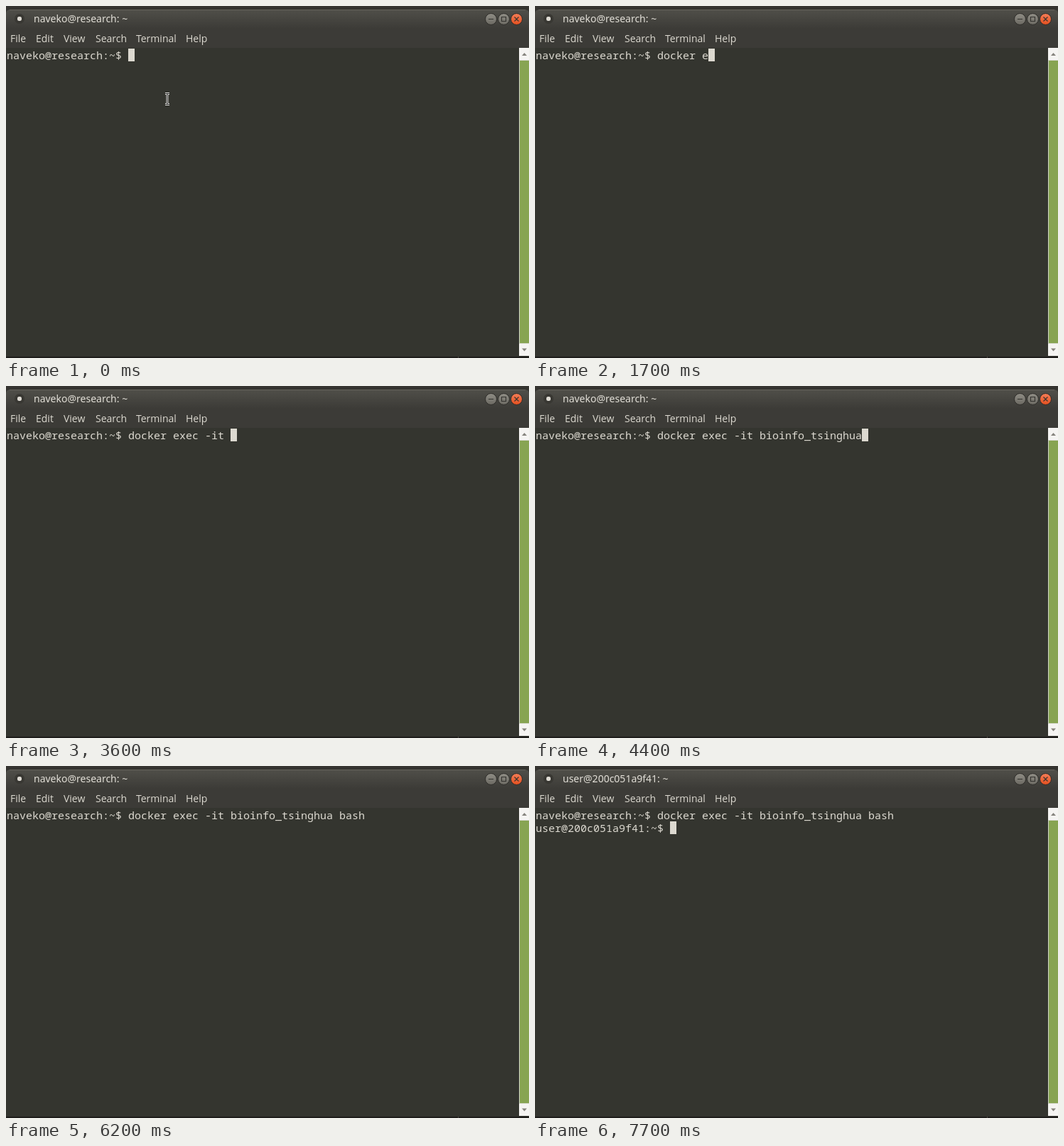
An HTML page that plays this animation: 736x496 px, repeating every 8 s.

```html
<!DOCTYPE html>
<html lang="en">
<head>
<meta charset="utf-8">
<title>Terminal session</title>
<style>
  html, body { margin: 0; width: 100%; height: 100%; overflow: hidden; background: #34352f; }
  svg { display: block; width: 736px; height: 496px; }
  text { white-space: pre; fill: #dcd9d0; }
  .ui { font: 14px "Open Sans", "Noto Sans", sans-serif; }
  .title { font: 500 14px "Noto Sans", "Open Sans", sans-serif; fill: #e2dfd7; }
  .mono { font: 15px "Noto Sans Mono", "Liberation Mono", monospace; }
  .crisp { shape-rendering: crispEdges; }
</style>
</head>
<body>
<svg viewBox="0 0 736 496">
  <defs>
    <linearGradient id="bar" x2="0" y2="1">
      <stop stop-color="#504f49"/><stop offset="1" stop-color="#3c3b37"/>
    </linearGradient>
    <linearGradient id="grey" x2="0" y2="1">
      <stop stop-color="#8f8d85"/><stop offset="1" stop-color="#6b6962"/>
    </linearGradient>
    <linearGradient id="orange" x2="0" y2="1">
      <stop stop-color="#f47e58"/><stop offset="1" stop-color="#e4501f"/>
    </linearGradient>
  </defs>

  <rect width="736" height="12" fill="#353430"/>
  <path d="M0 32V11Q0 5 6 5H730Q736 5 736 11V32Z" fill="url(#bar)"/>
  <path d="M5 5.5H731" stroke="#65635c"/>
  <rect y="32" width="736" height="27" fill="#3c3b37"/>
  <rect y="59" width="736" height="435" fill="#34352f"/>
  <rect class="crisp" y="494" width="736" height="2" fill="#1e1d1b"/>
  <rect class="crisp" x="636" y="494" width="1" height="2" fill="#4a4944"/>

  <circle cx="19" cy="18" r="7" fill="#393833"/>
  <circle cx="19" cy="18" r="3.8" fill="#dedbd3" stroke="#252420"/>
  <text id="title" class="title" x="39" y="23"></text>
  <g id="menu" class="ui"></g>

  <g stroke="#2b2a27">
    <circle cx="682.5" cy="18.5" r="8" fill="url(#grey)"/>
    <circle cx="700.5" cy="18.5" r="8" fill="url(#grey)"/>
    <circle cx="718.5" cy="18.5" r="8" fill="url(#orange)"/>
    <path d="M679 18.5h7M697.5 15.5h6v6h-6zM715.5 15.5l6 6m0 -6l-6 6" fill="none" stroke="#34332f" stroke-width="1.1"/>
  </g>

  <g class="crisp">
    <rect x="722" y="59" width="14" height="434" fill="#f5f4f2"/>
    <rect x="722" y="76" width="14" height="400" fill="#d3d6c8"/>
    <rect x="723" y="77" width="13" height="398" fill="#87a452"/>
  </g>
  <path d="M726 70l3.5 -4 3.5 4zM726 482.500l3.500 4 3.500 -4z" fill="#85837d"/>

  <text id="line1" class="mono" x="1" y="75"></text>
  <text id="line2" class="mono" x="1" y="93"></text>
  <rect id="cursor" class="crisp" width="9" height="18" fill="#dcd9d0"/>

  <g id="pointer" fill="none">
    <path id="beam" d="M224 123.500h2.500l.5 .5 .5 -.5h2.500M227 124v13M224 138.500h2.500l.5 -.5 .5 .5h2.500" stroke="#f4f4f0" stroke-width="2.800"/>
    <path d="M224 123.500h6M227 124v14M224 138.500h6" stroke="#111" stroke-width="1"/>
  </g>
</svg>
<script>
const LOOP = 8000, CELL = 9, LEFT = 172;
const host = "naveko@research", container = "user@200c051a9f41";
const command = "docker exec -it bioinfo_tsinghua bash";
const keyTimes = [
  400, 600, 800, 1000, 1200, 1300, 1500, 1700, 2000, 2300, 2500, 2700,
  3000, 3300, 3400, 3600, 3800, 3900, 4000, 4900, 5100, 5300, 5400, 5600
];
const completion = { at: 4400, length: 13 };
const cursorOff = [[4800, 4900], [6200, 6700], [7300, 7700]];
const enterAt = 6700, promptAt = 6800, pointerUntil = 300;

const $ = id => document.getElementById(id);
const show = (id, on) => $(id).setAttribute("visibility", on ? "visible" : "hidden");
const setText = (id, value) => {
  if ($(id).textContent !== value) $(id).textContent = value;
};

for (const [label, x] of [["File", 6], ["Edit", 42], ["View", 81], ["Search", 126], ["Terminal", 183], ["Help", 253]]) {
  const item = document.createElementNS("http://www.w3.org/2000/svg", "text");
  item.textContent = label;
  item.setAttribute("x", x);
  item.setAttribute("y", 51);
  $("menu").append(item);
}

function draw(t) {
  const typed = keyTimes.filter(k => k <= t).length + (t >= completion.at ? completion.length : 0);
  const entered = t >= enterAt, ready = t >= promptAt;
  setText("title", `${ready ? container : host}: ~`);
  setText("line1", `${host}:~$ ${command.slice(0, typed)}`);
  setText("line2", ready ? `${container}:~$ ` : "");
  $("cursor").setAttribute("x", ready ? 190 : entered ? 1 : LEFT + typed * CELL);
  $("cursor").setAttribute("y", entered ? 78 : 60);
  show("cursor", !cursorOff.some(([from, to]) => t >= from && t < to));
  show("pointer", t < pointerUntil);
}

const start = performance.now();
function tick() {
  draw((performance.now() - start) % LOOP);
  requestAnimationFrame(tick);
}
tick();
</script>
</body>
</html>
```
